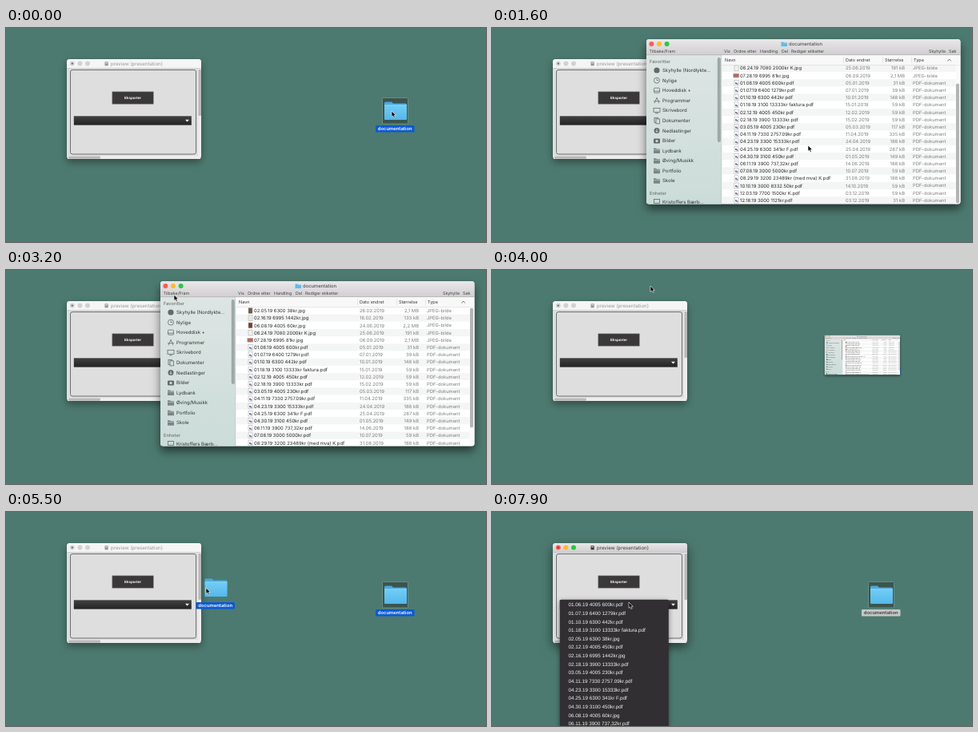
An HTML page that plays this animation: 600x268 px, repeating every 8 s.

```html
<!DOCTYPE html>
<html lang="no">
<head>
<meta charset="utf-8">
<title>Folder drop</title>
<style>
  html, body { margin: 0; width: 100%; height: 100%; overflow: hidden; background: #4d7a70; }
  svg { display: block; width: 100%; height: 100%; }
  text { font-family: Inter, Roboto, sans-serif; text-rendering: geometricPrecision; white-space: pre; }
  .plain { font-family: "Liberation Sans", Arial, sans-serif; }
  #preview { filter: drop-shadow(0 4px 5px rgba(0, 0, 0, .38)); }
  #preview.active { filter: drop-shadow(0 5px 7px rgba(0, 0, 0, .55)); }
  #finder { filter: drop-shadow(0 6px 6px rgba(0, 0, 0, .55)); }
  #menu { filter: drop-shadow(0 2px 3px rgba(0, 0, 0, .45)); }
</style>
</head>
<body>
<svg id="stage" viewBox="0 0 600 268" preserveAspectRatio="none"></svg>
<script>
const LOOP = 8000, STEP = 100, ROW = 9.19, OVERFLOW = 28.2;

// name | modified | size
const files = `02.05.19 6300 38kr.jpg|26.02.2019|2,1 MB
02.16.19 6995 1442kr.jpg|16.02.2019|133 kB
06.08.19 4005 60kr.jpg|24.06.2019|2,2 MB
06.24.19 7080 2000kr K.jpg|25.06.2019|191 kB
07.28.19 6995 81kr.jpg|06.09.2019|2,1 MB
01.06.19 4005 600kr.pdf|05.01.2019|31 kB
01.07.19 6400 1279kr.pdf|07.01.2019|39 kB
01.10.19 6300 442kr.pdf|10.01.2019|148 kB
01.18.19 3100 13333kr faktura.pdf|15.01.2019|59 kB
02.12.19 4005 450kr.pdf|12.02.2019|59 kB
02.18.19 3900 13333kr.pdf|15.02.2019|59 kB
03.05.19 4005 230kr.pdf|05.03.2019|117 kB
04.11.19 7330 2757.09kr.pdf|11.04.2019|335 kB
04.23.19 3300 15333kr.pdf|24.04.2019|188 kB
04.25.19 6300 341kr F.pdf|25.04.2019|287 kB
04.30.19 3100 450kr.pdf|01.05.2019|149 kB
06.11.19 3900 737,32kr.pdf|14.06.2019|188 kB
07.08.19 3000 5000kr.pdf|10.07.2019|59 kB
08.29.19 3200 23489kr (med mva) K.pdf|31.08.2019|188 kB
10.10.19 3000 8332.50kr.pdf|14.10.2019|59 kB
12.03.19 7700 1500kr K.pdf|03.12.2019|59 kB
12.18.19 3000 1121kr.pdf|03.12.2019|31 kB`.split('\n').map(line => line.split('|'));
const sortedNames = files.map(f => f[0]).sort();

const places = ['Skyhylle (Nordlykte...', 'Nylige', 'Hoveddisk +', 'Programmer', 'Skrivebord', 'Dokumenter',
  'Nedlastinger', 'Bilder', 'Lydbank', 'Øving/Musikk', 'Portfolio', 'Skole'];

const rect = (x, y, w, h, fill, more = '') =>
  `<rect x="${x}" y="${y}" width="${w}" height="${h}" fill="${fill}" ${more}/>`;
const circle = (x, y, r, fill, more = '') => `<circle cx="${x}" cy="${y}" r="${r}" fill="${fill}" ${more}/>`;
const path = (d, fill, more = '') => `<path d="${d}" fill="${fill}" ${more}/>`;
// y is the vertical middle of the text
const text = (x, y, size, fill, s, more = '') =>
  `<text x="${x}" y="${y + size * .36}" font-size="${size}" fill="${fill}" ${more}>${s}</text>`;
const gradient = (id, top, bottom) =>
  `<linearGradient id="${id}" x2="0" y2="1"><stop stop-color="${top}"/><stop offset="1" stop-color="${bottom}"/></linearGradient>`;
const lights = (x, y, colors) => colors.map((c, i) => circle(x + i * 9.6, y, 3, c)).join('');

const defs = `<defs>
  ${gradient('bar', '#e9e7e9', '#d0ced0')}
  ${gradient('side', '#dde5e3', '#cbdcd8')}
  ${gradient('combo', '#434143', '#232223')}
  ${gradient('blue', '#72cdf5', '#55b7ea')}
  <clipPath id="listClip"><rect x="287" y="46" width="299" height="174.5"/></clipPath>
  <clipPath id="finderClip"><rect x="193" y="14" width="392.5" height="206.5" rx="3.5"/></clipPath>
  <g id="folder">
    ${path('M473 94q0-1.5 1.5-1.5h7.5l2 2h15.500q1.500 0 1.500 1.500v5h-28z', '#4baade')}
    ${rect(473, 96.500, 28, 18.500, 'url(#blue)', 'rx="1"')}
    ${rect(473, 96.500, 28, .6, '#9be0fb')}
  </g>
</defs>`;

function label(id, fill, ink) {
  return `<g id="${id}">${rect(462, 122, 48.5, 8.6, fill, 'rx="1.2"')}
    ${text(486.2, 126.2, 5.85, ink, 'documentation', 'text-anchor="middle" font-weight="600"')}</g>`;
}

const desktopFolder = rect(470.5, 87.5, 32, 32.5, '#3a554e', 'stroke="#74968d" stroke-width=".8" rx="1"') +
  '<use href="#folder"/>' + label('labelOn', '#0b5ad3', '#fff') + label('labelOff', '#c6c8c7', '#3c3c3c');

function previewBar(id, fill, ink, colors, dot) {
  return `<g id="${id}">${path('M76 50.500V42.500q0-3.500 3.500-3.500h161q3.500 0 3.500 3.500v8z', fill)}
    ${rect(76, 50, 168, .6, '#bdbdbd')}${lights(82.8, 44.5, colors)}${circle(82.8, 44.5, 1, dot)}
    ${rect(123.500, 42.300, 4.200, 5, ink, 'rx=".6"')}${rect(124.400, 43.200, 2.400, 1, '#eee')}
    ${text(131, 44.6, 6.1, ink, 'preview (presentation)')}</g>`;
}

const preview = `<g id="preview">
  ${rect(76, 39, 168, 125, '#dedede', 'rx="3.5"')}
  ${previewBar('barIdle', '#f5f5f5', '#979797', ['#d2d2d2', '#d2d2d2', '#d2d2d2'], '#555')}
  ${previewBar('barActive', 'url(#bar)', '#3a3a3a', ['#fc5b57', '#fdbc2e', '#29c940'], '#8b1a16')}
  ${rect(240, 51, 4, 109, '#ededed')}${rect(240.500, 52, 3.500, 58, '#b9b9b9', 'rx="1"')}
  ${rect(77, 160, 166, 4, '#ededed', 'rx="1"')}${rect(78, 160.500, 40, 3.300, '#b9b9b9', 'rx="1.2"')}
  ${rect(80.500, 52.500, 157, 105.500, 'none', 'stroke="#6f6f6f" rx="2.5"')}
  ${rect(132.800, 79.800, 51.500, 15.400, '#3a3839', 'stroke="#8c8c8c" stroke-width=".6"')}
  ${text(158.5, 87.6, 4.5, '#fff', 'Eksporter', 'class="plain" font-weight="bold" text-anchor="middle"')}
  ${rect(84.800, 110.300, 147, 11.300, 'url(#combo)')}
  ${path('M224 114.700h5l-2.500 2.700z', '#fff')}
  <g id="chosen">${text(87.5, 116, 6.3, '#fff', sortedNames[0], 'class="plain"')}</g>
</g>`;

const menu = `<g id="menu">${rect(84.800, 109.800, 136, 180, '#312f32', 'rx="1.500"')}
  ${sortedNames.slice(0, 15).map((name, i) =>
    text(95.5, 116 + i * 10.64, 6.3, '#f2f2f2', name, 'class="plain"')).join('')}</g>`;

const line = 'stroke="#626b6a" stroke-width=".8"';
const folderGlyph = path('M-4-3h3l1 1h4v5.500h-8z', '#7b8584') + rect(-4, -1, 8, .5, '#d5dfdd');
const glyphs = [
  circle(0, 0, 3.6, '#626b6a'),
  circle(0, 0, 3.5, 'none', line) + path('M0-2V0H2', 'none', line),
  rect(-3.500, -3, 7, 6, 'none', line + ' rx="1"') + path('M-3.500 1h7', 'none', line),
  path('M-3 3.500L0-3.500L3 3.500M-4 1h8', 'none', line),
  rect(-4, -3, 8, 5, 'none', line) + path('M-2 3.500h4', 'none', line),
  rect(-3, -3.500, 4.500, 6, 'none', line) + rect(-1, -2, 4.500, 6, '#d5dfdd', line),
  circle(0, 0, 3.5, '#626b6a') + path('M0-2V2M-1.500.500L0 2L1.500.500', 'none', 'stroke="#dfe8e6" stroke-width=".8"'),
  rect(-4, -2.500, 8, 6, '#626b6a', 'rx="1"') + circle(0, .5, 1.6, '#d5dfdd')
];

const sidebar = rect(193, 34, 94, 187, 'url(#side)') +
  text(197, 42.3, 5.7, '#6b7573', 'Favoritter', 'font-weight="500"') +
  places.map((name, i) => {
    const y = 53 + i * 12.57;
    return `<g transform="translate(206 ${y})">${glyphs[i] || folderGlyph}</g>` + text(213, y, 6, '#2f3433', name);
  }).join('') +
  text(197, 206.5, 5.7, '#6b7573', 'Enheter', 'font-weight="500"') +
  rect(202.500, 214.500, 7, 5, 'none', line) + text(213, 217.6, 6, '#2f3433', 'Kristoffers Bærb...') +
  rect(281.800, 37, 4, 106, '#9ca9a6', 'rx="2"') + rect(286.600, 34, .6, 187, '#b5bfbd');

const thumbColors = ['#6d5a4a', '#e9e9e6', '#7a3b35', '#f1f1ee', '#b5695c'];

function fileRow([name, date, size], i) {
  const y = 51 + i * ROW, isImage = name.endsWith('jpg');
  const icon = isImage
    ? rect(i === 4 ? 301.8 : 303, y - (i === 4 ? 2.4 : 3.4), i === 4 ? 7 : 5, i === 4 ? 4.8 : 6.8, thumbColors[i], 'stroke="#aaa" stroke-width=".5"')
    : rect(303, y - 3.400, 5, 6.800, '#fff', 'stroke="#a5a5a5" stroke-width=".5"') +
      rect(304, y - .5, 2.2, 2, '#8a6f98') + rect(305.600, y + .6, 1.800, 1.600, '#5c7fa8');
  return rect(288, y - ROW / 2, 292, ROW, i % 2 ? '#f4f5f5' : '#fff') + icon +
    text(310, y, 5.9, '#262626', name) +
    text(442, y, 5.9, '#7d7d7d', date) +
    text(516, y, 5.9, '#7d7d7d', size, 'text-anchor="end"') +
    text(526, y, 5.8, '#7d7d7d', isImage ? 'JPEG-bilde' : 'PDF-dokument');
}

const toolbar = [[196.5, 'Tilbake/Fram'], [290, 'Vis'], [302, 'Ordne etter'], [335, 'Handling'], [362, 'Del'],
  [374, 'Rediger etiketter'], [546, 'Skyhylle'], [571, 'Søk']];
const columns = [[291, 'Navn'], [442, 'Dato endret'], [491, 'Størrelse'], [527, 'Type']];

const finder = `<g id="finder"><g clip-path="url(#finderClip)">
  ${rect(193, 14, 393, 207, '#fff')}
  ${sidebar}
  ${rect(193, 14, 393, 20, 'url(#bar)')}${rect(193, 33.500, 393, .6, '#aaa')}
  ${lights(199.4, 20, ['#fc5b57', '#fdbc2e', '#29c940'])}
  ${path('M361.500 17.500h2.500l1 1h4v4.500h-7.500z', '#5cbdec')}
  ${text(371, 20.3, 5.95, '#3a3a3a', 'documentation')}
  ${toolbar.map(([x, s]) => text(x, 29.3, 5.3, '#444', s)).join('')}
  <g clip-path="url(#listClip)"><g id="rows">${files.map(fileRow).join('')}</g></g>
  ${rect(287.200, 34.100, 299, 12, '#f8f8f8')}${rect(287.200, 46, 299, .5, '#cfcfcf')}
  ${[439, 488, 524].map(x => rect(x, 36, .5, 8, '#d2d2d2')).join('')}
  ${columns.map(([x, s]) => text(x, 40.2, 5.5, '#3a3a3a', s)).join('')}
  ${path('M569.500 41.500l2.200-2.500l2.200 2.500', 'none', 'stroke="#555" stroke-width=".8"')}
  ${rect(579.500, 46.500, 6.500, 174, '#fafafa')}
  <rect id="thumb" x="580" width="4" height="150" rx="2" fill="#b4b4b4"/>
</g></g>`;

const dragged = `<g id="dragged"><use href="#folder"/>${label('dragLabel', '#0b5ad3', '#fff')}</g>`;
const cursor = `<g id="cursor">${path('M0 0V7.400L1.700 5.800L2.900 8.400L4.200 7.800L3.100 5.300H5.300Z', '#000',
  'stroke="#fff" stroke-width=".6"')}</g>`;

document.getElementById('stage').innerHTML =
  defs + rect(0, 0, 600, 268, '#4d7a70') + desktopFolder + preview + menu + finder + dragged + cursor;

const $ = id => document.getElementById(id);
const show = (id, on) => $(id).setAttribute('display', on ? 'inline' : 'none');

// Eased value between [time, value] keys
function track(keys, t) {
  const next = keys.findIndex(key => key[0] > t);
  if (next < 0) return keys[keys.length - 1][1];
  if (next === 0) return keys[0][1];
  const [t0, a] = keys[next - 1], [t1, b] = keys[next];
  const u = (t - t0) / (t1 - t0);
  return a + (b - a) * u * u * (3 - 2 * u);
}

const cursorKeys = [[0, 482, 104], [700, 482, 104], [1300, 395, 147], [2300, 395, 147], [3200, 210, 31],
  [3800, 198, 20], [4100, 198, 20], [4700, 474.5, 104], [4900, 474.5, 104], [5500, 250, 95], [5900, 168, 98],
  [6700, 169, 97], [7300, 171, 113]];
const cursorX = cursorKeys.map(([t, x]) => [t, x]);
const cursorY = cursorKeys.map(([t, , y]) => [t, y]);
const scrollKeys = [[900, 0], [1500, OVERFLOW], [2200, OVERFLOW], [2900, 0]];
const zoomKeys = [[300, 0], [600, 1], [3900, 1], [4000, .24], [4100, 0]];

function draw(t) {
  const x = track(cursorX, t), y = track(cursorY, t);
  $('cursor').setAttribute('transform', `translate(${x} ${y})`);

  // The window grows out of the folder icon and shrinks back into it
  const zoom = track(zoomKeys, t);
  show('finder', zoom > 0);
  $('finder').setAttribute('transform', `translate(486 103) scale(${zoom}) translate(-486 -103) translate(${0} ${0})`);

  const scroll = track(scrollKeys, t);
  $('rows').setAttribute('transform', `translate(0 ${-scroll})`);
  $('thumb').setAttribute('y', 47.5 + scroll / OVERFLOW * 22);

  show('dragged', t >= 4900 && t < 6100);
  $('dragged').setAttribute('transform', `translate(${x - 474.5} ${y - 104})`);
  show('chosen', t >= 6100);

  const active = t >= 7600;
  $('preview').classList.toggle('active', active);
  show('barIdle', !active);
  show('barActive', active);
  show('labelOn', !active);
  show('labelOff', active);
  show('menu', t >= 7700);
}

const start = performance.now();
function tick() {
  const t = (performance.now() - start) % LOOP;
  draw(Math.floor(t / STEP) * STEP);
  requestAnimationFrame(tick);
}
tick();
</script>
</body>
</html>
```
